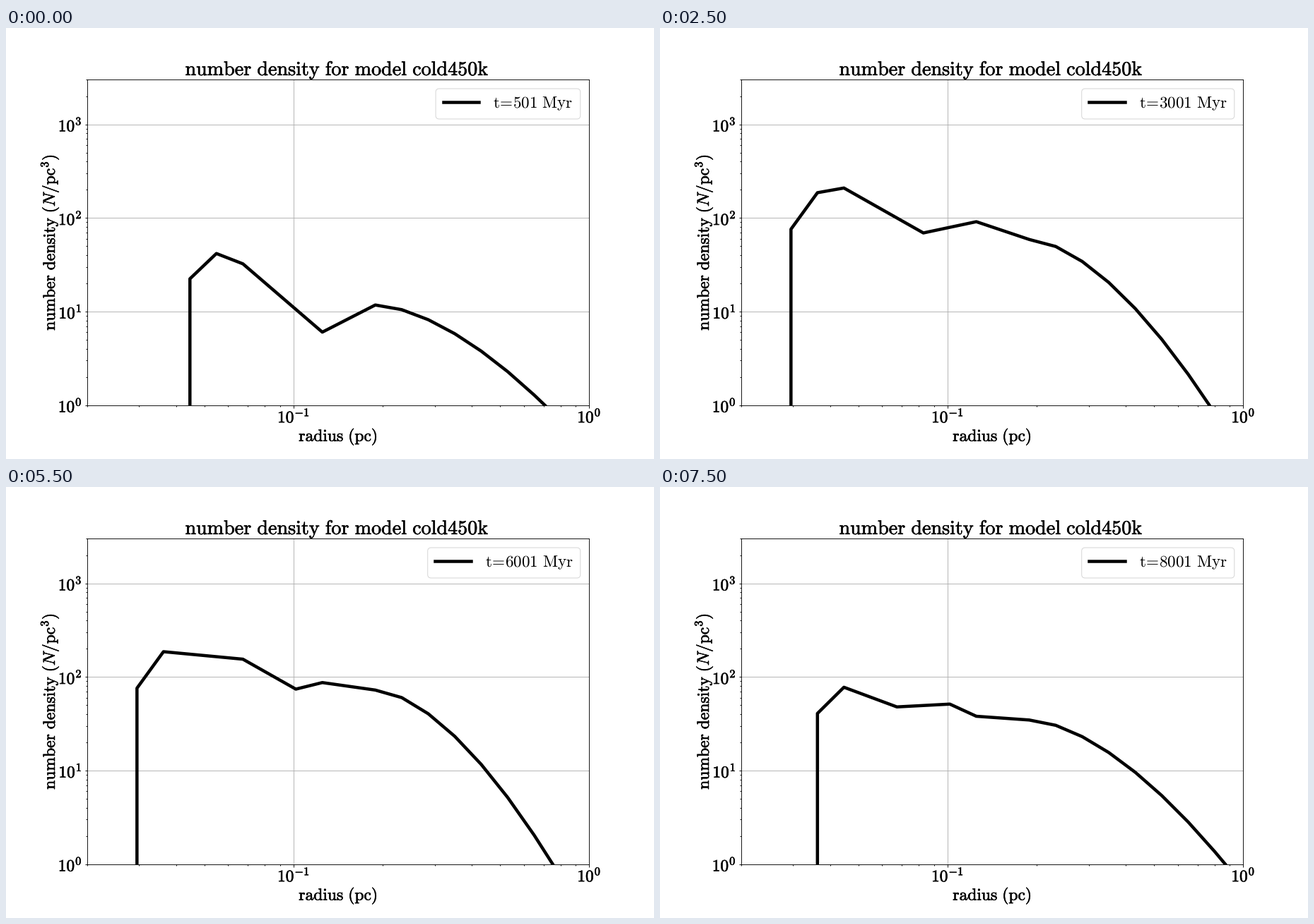
These frames come from a looping animation (917x611 px, 8 s). A matplotlib script:

```python
import numpy as np
import matplotlib.pyplot as plt
from matplotlib.animation import FuncAnimation
from matplotlib.patches import FancyBboxPatch
from matplotlib.patheffects import withStroke
from matplotlib.ticker import FuncFormatter, NullFormatter

W, H = 917, 611
FRAMES, INTERVAL = 16, 500
LEGEND, TICK, LABEL, TITLE = 23.1, 23.3, 23.6, 28.1
KNEE, FALL = 10, 1.65  # bin where the outer slope begins, and its steepness

plt.rcParams.update({
    "mathtext.fontset": "cm",
    "text.hinting": "none",
    "axes.linewidth": 0.9,
})
BOLD = [withStroke(linewidth=0.6, foreground="black")]

# step: (radius bin, log10 density) at the corners, ending where it meets 1
POSES = {
    0: [(3, 1.35), (4, 1.62), (5, 1.51), (8, 0.78), (KNEE, 1.07), (16.4, 0)],
    3: [(3, 1.35), (4, 1.62), (6, 1.56), (7, 1.75), (8, 1.78), (KNEE, 1.66),
        (16.9, 0)],
    5: [(1, 1.88), (2, 2.27), (3, 2.32), (6, 1.84), (8, 1.96), (KNEE, 1.77),
        (16.8, 0)],
    7: [(1, 1.88), (2, 2.01), (3, 1.52), (5, 1.92), (7, 1.58), (KNEE, 1.72),
        (17.2, 0)],
    11: [(1, 1.88), (2, 2.27), (5, 2.19), (7, 1.87), (8, 1.94), (KNEE, 1.86),
         (16.7, 0)],
    13: [(0, 2.15), (1, 2.28), (3, 1.35), (6, 1.72), (8, 1.75), (KNEE, 1.54),
         (16.85, 0)],
    15: [(2, 1.61), (3, 1.89), (5, 1.68), (7, 1.71), (8, 1.58), (KNEE, 1.54),
         (17.4, 0)],
}


def profile(step):
    """Bins and log densities, blended between the nearest poses."""
    a = np.array(POSES[max(k for k in POSES if k <= step)])
    b = np.array(POSES[min(k for k in POSES if k >= step)])
    gap = [k for k in POSES if k <= step][-1], [k for k in POSES if k >= step][0]
    f = (step - gap[0]) / max(gap[1] - gap[0], 1)

    def mix(u, v):
        return (1 - f) * u + f * v

    inner = np.arange(max(a[0, 0], b[0, 0]), KNEE + 1)
    logs = mix(np.interp(inner, *a.T), np.interp(inner, *b.T))
    end = mix(a[-1, 0], b[-1, 0])
    outer = np.arange(KNEE + 1, np.ceil(end))
    slope = logs[-1] * (1 - ((outer - KNEE) / (end - KNEE)) ** FALL)
    return np.append(inner, outer), np.append(logs, slope), end


def curve(step):
    bins, logs, end = profile(step)
    # rise from below the axis, then run on past the end
    bins = np.concatenate([bins[:1], bins, [1.5 * end - 0.5 * bins[-1]]])
    logs = np.concatenate([[-1], logs, [-0.5 * logs[-1]]])
    return 10 ** (-1.6195 + 0.08958 * bins), 10 ** logs


def rm(text):
    return r"$\mathrm{%s}$" % text.replace(" ", r"\ ")


fig = plt.figure(figsize=((W + 1e-6) / 72, (H + 1e-6) / 72), dpi=72,
                 facecolor="white")
ax = fig.add_axes([0.125, 0.125, 0.775, 0.755])
ax.set(xscale="log", yscale="log", xlim=(0.02, 1), ylim=(1, 3000))
ax.grid(True, color="#b0b0b0", lw=0.9)
ax.tick_params(which="major", length=3.5, width=0.9, labelsize=TICK)
ax.tick_params(which="minor", length=2, width=0.9)
ax.tick_params(axis="x", pad=1.5)
power = FuncFormatter(lambda v, _: "$10^{%d}$" % round(np.log10(v)))
for axis in (ax.xaxis, ax.yaxis):
    axis.set_major_formatter(power)
    axis.set_minor_formatter(NullFormatter())
    for text in axis.get_ticklabels():
        text.set_path_effects(BOLD)
line, = ax.plot([], [], color="black", lw=4.5)

# overlay in pixels, y down
top = fig.add_axes([0, 0, 1, 1])
top.set(xlim=(0, W), ylim=(H, 0))
top.axis("off")


def caption(x, y, text, size, **style):
    top.text(x, y, text, size=size, ha="center", va="baseline",
             path_effects=BOLD, **style)


caption(468.5, 67, rm("number density for model cold450k"), TITLE)
caption(470, 585.5, rm("radius (pc)"), LABEL)
caption(69, 304, r"$\mathrm{number\ density}\ (N/\mathrm{pc}^3)$", LABEL,
        rotation=90, rotation_mode="anchor")

BOX_RIGHT, BOX_TOP, BOX_H = 812.8, 86, 43
box = FancyBboxPatch((600, BOX_TOP), 200, BOX_H, fc="white", ec="#d6d6d6",
                     lw=1, boxstyle="round,pad=0,rounding_size=5")
top.add_patch(box)
key, = top.plot([], [], color="black", lw=4.5)
stamp = top.text(0, 113.5, "", size=LEGEND)


def draw(step):
    line.set_data(*curve(step))
    time = str(501 + 500 * step)
    width = 170.5 + 11.4 * len(time)
    left = BOX_RIGHT - width
    box.set_bounds(left, BOX_TOP, width, BOX_H)
    key.set_data([left + 10.5, left + 61], [105.5, 105.5])
    stamp.set_x(left + 81)
    stamp.set_text(rm(rf"t\!=\!{time} Myr"))
    return line, box, key, stamp


anim = FuncAnimation(fig, draw, frames=FRAMES, interval=INTERVAL,
                     repeat=True, repeat_delay=0, blit=False)
plt.show()
```
